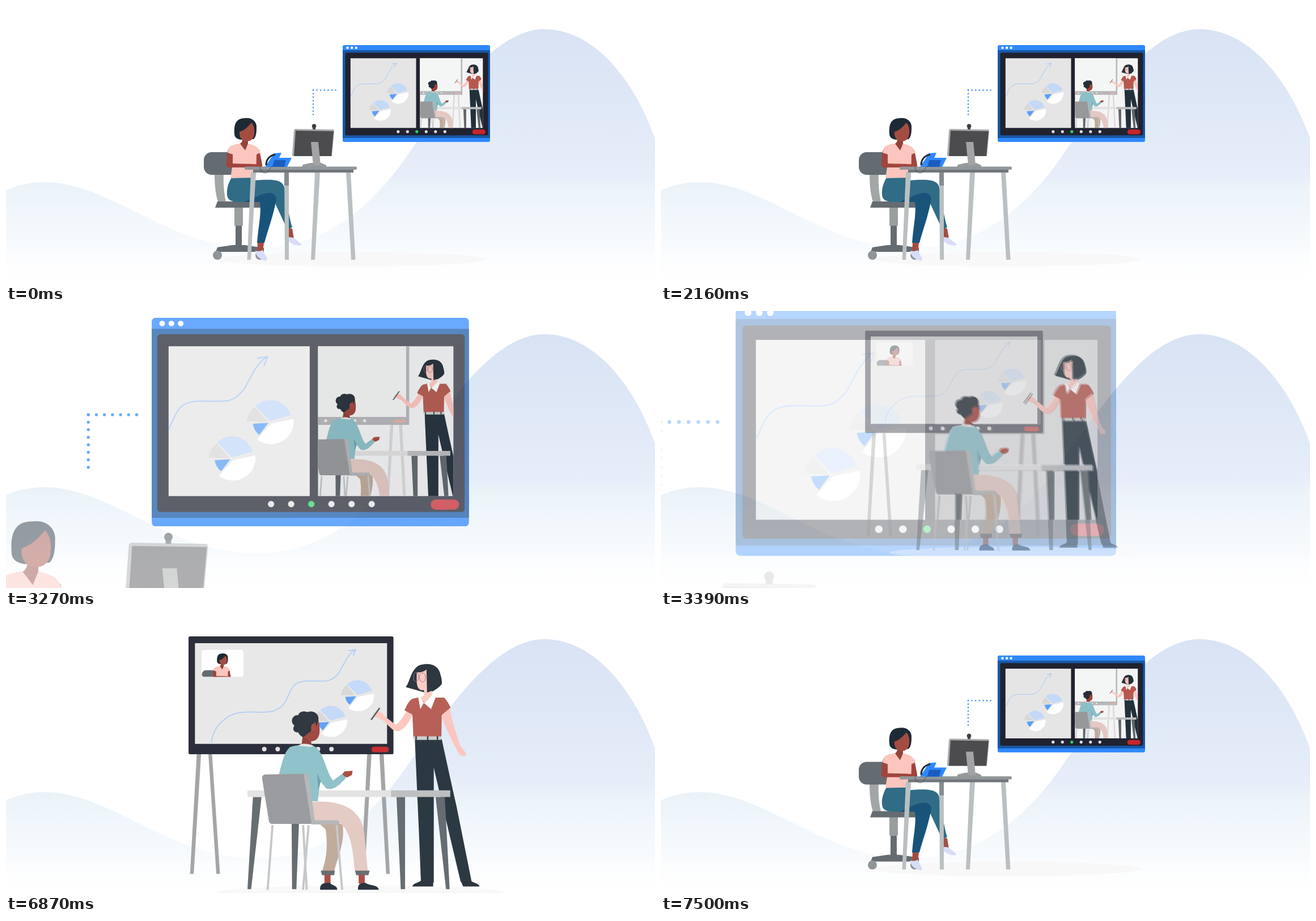
Write an HTML page that moves like this. It is 1145 px wide and 489 px high and loops after 7.63 s.

```html
<!DOCTYPE html>
<html lang="en">
<head>
<meta charset="utf-8">
<title>Remote meeting</title>
<style>
html, body { margin: 0; width: 100%; height: 100%; overflow: hidden; background: #fff; }
svg { display: block; width: 100%; height: 100%; }
</style>
</head>
<body>
<svg viewBox="0 0 1145 489">
<defs>
  <linearGradient id="sky" gradientUnits="userSpaceOnUse" x1="0" y1="41" x2="0" y2="489">
    <stop offset="0" stop-color="#d8e3f4"/>
    <stop offset=".3" stop-color="#dfe8f6"/>
    <stop offset=".58" stop-color="#e7eef9"/>
    <stop offset=".62" stop-color="#ebf3f9"/>
    <stop offset=".86" stop-color="#f8fbfd"/>
    <stop offset=".9" stop-color="#fcfdfe"/>
    <stop offset="1" stop-color="#fff"/>
  </linearGradient>
  <clipPath id="leftPanel"><rect x="607.8" y="92.3" width="115.7" height="123"/></clipPath>
  <clipPath id="rightPanel"><rect x="730.3" y="92.3" width="111" height="123"/></clipPath>
  <clipPath id="inset"><rect x="345" y="51" width="68.5" height="44" rx="4"/></clipPath>

  <g id="pie">
    <path d="M0,-1L-17,-18.500A25,25 0 0 1 24,-8Z" fill="#c3d9f8"/>
    <path d="M-3,0L-27,-1A26,26 0 0 1 -18,-17.500Z" fill="#d8d8d8"/>
    <path d="M-2,1L-20,2A21,21 0 0 0 -12.500,15Z" fill="#5b9ef8"/>
    <path d="M1,2L27,-3.500A26,26 0 0 1 -15,20Z" fill="#fff"/>
  </g>
  <g id="chart">
    <path d="M361,203C363,178 385,154 415,153C445,151 466,160 482,136C492,118 491,104 515,102C545,101 556,107 570,88C580,70 585,58 596,51M585,52.500L597,50.500L593,61" fill="none" stroke="#a4c7f7" stroke-width="1.400"/>
    <use href="#pie" x="600" y="126"/>
    <use href="#pie" x="556" y="168"/>
  </g>

  <g id="easel">
    <path d="M337,222h7L332,418h-6ZM356,222h6L375,418h-6ZM616,222h7L612,418h-6ZM636,222h7L653,418h-6Z"/>
  </g>

  <g id="people">
    <g id="teacher">
      <path d="M682,148C676,160 670,168 663,174L644,159L640,154L635,152L626,155L628,160L641,166L657,181C663,185 668,185 672,182C681,176 686,166 691,156Z" fill="#fdc5bd"/>
      <path d="M738,150L751,147C756,170 762,190 769,209L778,220L776,225L768,224C758,206 746,184 738,160Z" fill="#fdc5bd"/>
      <path d="M622.500,165.500L636.500,146" stroke="#5e5a5c" stroke-width="2.600"/>
      <path d="M694,197H738C744,225 752,262 762,306L787,431H769L738,300L725,244V432H704C701,350 697,270 694,197Z" fill="#22303a"/>
      <path d="M690,438.500C691,433 699,433 704,429H724V438.500ZM769,429H786C789,433 799,433 800,438.500H773Z" fill="#222c36"/>
      <path d="M690,131L699,129H728L742,129C746,133 749,138 752.500,145.500L741,155L738,158L737.500,193H691.500L690,157L677,150C681,141 685,134 690,131Z" fill="#b5594f"/>
      <path d="M691,193H737V198.500H692Z" fill="#cdcdcd"/>
      <path d="M696,192.500v6M715,192.500v6M731,192.500v6" stroke="#22303a" stroke-width="2.200"/>
      <path d="M679,112C687,103 688,75 709,74.500C728,72 735,84 736,92C738.500,99 738.500,105 738,107C731,116 722,120 714,122L694,116Z" fill="#232e37"/>
      <path d="M697,88C704,88 709,87 713,83L714,121L722,118V127L712,139L702,129L709,126V117C701,118 698,113 697,104Z" fill="#fdc9c1"/>
      <path d="M699.500,129L703,148L708.600,138L720.500,148L728,129L722,125C717,132 712,136 709,138L703,128Z" fill="#fff"/>
      <g fill="none" stroke="#99737a" stroke-width=".9">
        <ellipse cx="696" cy="95.500" rx="4.200" ry="7.500"/>
        <ellipse cx="706.500" cy="96" rx="5" ry="7.500"/>
        <path d="M711,95h4"/>
      </g>
    </g>
    <path d="M429,292h14L426,443h-6ZM492,292h14L500,443h-7ZM664,292h14L678,443h-7ZM728,292h15L751,443h-6Z" fill="#5f676c"/>
    <path d="M420,281H655V292H420Z" fill="#e2e2e2"/>
    <path d="M655,281H752V292H655Z" fill="#bcbdbf"/>
    <g id="student">
      <path d="M546,419h10v15h-10ZM602,419h10v15h-10Z" fill="#a6473c"/>
      <path d="M539,444C538,435 543,432 555,432.500C559,438 567,436 567,444ZM601,444C600,435 605,432 613,432.500C620,438 634,435 635,444Z" fill="#222c36"/>
      <path d="M538,336H576C580,368 566,395 562,414H542C551,388 551,368 548,345Z" fill="#bfa998"/>
      <path d="M522,300C575,296 606,312 611,350L617,414H596C592,378 590,350 572,335H522Z" fill="#e3c9c2"/>
      <path d="M540,412.500H563L562,420H542ZM596,412.500H620L618,420H598Z" fill="#62666a"/>
      <path d="M461,338L453,444M511,338L517,444M520,338L511,444M566,338L575,444" stroke="#c3c6c8" stroke-width="3.600"/>
      <path d="M511,188L529,187L524,201L526,210H508Z" fill="#8f3b33"/>
      <path d="M573,257L579,250L592,249L591,256L583,260Z" fill="#a6473c"/>
      <path d="M490,210C500,206 518,207 528,208C545,216 547,248 560,265L575,254L581,261C570,273 560,282 549,278L539,266L535,299H515L471,258C477,232 481,217 490,210Z" fill="#8bbfc7"/>
      <path d="M534,253L540,267L536,280Z" fill="#6b9da5"/>
      <path d="M503,208C508,203 519,204 528,208L524,210Z" fill="#e6e6e6"/>
      <path d="M511,193L524,168L536,165C538,172 538.500,180 538,186C537,197 531,201 522,201Z" fill="#9d4239"/>
      <path d="M497,175C489,170 493,157 503,158C505,151 514,151 518,153C527,149 538,155 536,166L533,176L531,169L525,174L524,184L511,194C506,192 504,188 503,186C495,187 493,179 497,175Z" fill="#262f38"/>
      <ellipse cx="528" cy="178" rx="4" ry="5.500" fill="#a6473c"/>
      <path d="M449,255L516,254L527,336H460Q456,336 455,331L444,262Q443,256 449,255Z" fill="#97989b"/>
      <path d="M512,254Q520,253 521,259L530,330H567Q571,331 571,337H525Z" fill="#b3b4b6"/>
    </g>
  </g>

  <g id="woman">
    <path d="M368,296H384C383,315 385,332 388,346H374C369,330 368,312 368,296Z" fill="#a2a6a7"/>
    <rect x="349" y="258" width="62" height="40" rx="14" fill="#656c71"/>
    <path d="M403,355h15v33h-15Z" fill="#999e9f"/>
    <path d="M369,356L373,345H452V356ZM405,388h11v35h-11ZM370,434L373,426L400,422H420L455,427V434Z" fill="#656c71"/>
    <circle cx="373" cy="440" r="8" fill="#8f9597"/>
    <circle cx="448" cy="440" r="8" fill="#8f9597"/>
    <path d="M444,416l11,2l-2,17h-10ZM497,391l8,2l3,18l-10,-2Z" fill="#a54c41"/>
    <path d="M440,432C447,434 450,432 453,431L461,446L459,450C449,448 440,442 440,432ZM499,408L507,409L521,420L520,423C509,423 499,419 497,411Z" fill="#d7ddf8"/>
    <path d="M398,303C391,314 388,328 391,338C395,347 408,346 425,346L470,338L496,394L505,391C497,365 496,338 490,317C484,305 465,306 437,308V300Z" fill="#306c86"/>
    <path d="M420,346H448C451,365 445,390 443,418H456C462,395 472,370 477,340C474,327 463,329 450,333Z" fill="#18547a"/>
    <path d="M394,251C388,258 391,270 388,281L398,286H452V280L447,254Z" fill="#a0453d"/>
    <path d="M394,249C402,243 411,243 416,243H428C439,246 443,248 445,252L449,259L442,262L441,303L396,304L400,278V262L391,259Z" fill="#fcc5be"/>
    <path d="M389,277C400,279 430,278 452,280V285H392Q388,283 389,277Z" fill="#a0453d"/>
    <path d="M417,232H427V243L422,255L413,243Q418,240 417,232Z" fill="#94423a"/>
    <path d="M403,226C402,212 404,198 421,198C434,196 443,204 442,215C442,224 441,231 437,235L420,236C412,237 403,234 403,226Z" fill="#1d2a36"/>
    <path d="M412,222C420,220 427,213 433,206C437,210 439,217 438,226C437,235 431,239 425,239C416,238 411,232 412,222Z" fill="#a54c41"/>
  </g>
</defs>

<path fill="url(#sky)" d="M0,325C45,306 90,307 140,324C230,355 320,427 440,428C560,429 650,352 712,258C780,165 860,41 950,41C1040,41 1110,135 1145,234V489H0Z"/>

<g id="desk">
  <ellipse cx="610" cy="447" rx="235" ry="13" fill="#f8f8f9"/>
  <use href="#woman"/>
  <path d="M432,293h9L432,448h-6.500ZM491,293h8v155h-7ZM545,293h9L545,448h-7ZM600,293h8L616.500,448h-7.500Z" fill="#bac0c2"/>
  <path d="M491,293h8v24h-8Z" fill="#858b8f"/>
  <path d="M436,288H613V294H436Z" fill="#70767b"/>
  <rect x="421" y="283.500" width="198" height="5.500" rx="2" fill="#91979a"/>
  <path d="M457,284L473,260L486,259L482,268H504L496,284Z" fill="#2f88ff"/>
  <path d="M473,272H494L491,284H470Z" fill="#1b5dbd"/>
  <path d="M459,281C459,270 466,264 475,262" fill="none" stroke="#222d3a" stroke-width="3.200"/>
  <path d="M448,284C448,292 456,297 460,294C465,291 466,285 470,283" fill="none" stroke="#222d3a" stroke-dasharray="1.500 1"/>
  <path d="M522,284L524,280L538,277H556L565,281V284Z" fill="#97999b"/>
  <path d="M511,217L577,218Q579,218 579,221L575,265H506Q504,264 505,261L508,220Q508,217 511,217Z" fill="#a9abac"/>
  <path d="M511,220L578,221L574,265H508Z" fill="#4c4c4f"/>
  <path d="M538,240H551L555,281H542Z" fill="#a1a3a4"/>
  <path d="M541,212h5v6h-5Z" fill="#4c4c4f"/>
  <circle cx="543.500" cy="212" r="3.800" fill="#3e3f42"/>
</g>

<g id="frame">
  <path d="M542,148.500H583" fill="none" stroke="#2f88ff" stroke-width="2.500" stroke-linecap="round" stroke-dasharray="0 6.600"/>
  <path d="M542,148.500V192" fill="none" stroke="#2f88ff" stroke-width="2.500" stroke-linecap="round" stroke-dasharray="0 6.160"/>
  <rect x="594" y="69" width="260" height="171" rx="3" fill="#2f88ff"/>
  <path d="M594,78H854V233H594Z" fill="#1757a6"/>
  <rect x="598.500" y="82.500" width="252" height="145.700" rx="2.500" fill="#20222f"/>
  <g id="windowDots" fill="#fff"></g>
  <g id="callButtons" fill="#e4e4e4"></g>
  <rect x="822.700" y="218" width="23.200" height="8.400" rx="4.200" fill="#c7252b"/>
  <g clip-path="url(#leftPanel)">
    <path d="M600,90H730V220H600Z" fill="#e5e5e5"/>
    <use href="#chart" transform="translate(265 65) scale(.71)"/>
  </g>
</g>

<g id="roomPanel">
  <g clip-path="url(#rightPanel)">
    <path d="M730,90H845V220H730Z" fill="#f4f4f5"/>
    <g transform="translate(566.300 76.400) scale(.3623)">
      <use href="#easel" fill="#d9d9db"/>
      <path d="M324,29H659V222H324Z" fill="#b7b7ba"/>
      <path d="M334,40H652V204H334Z" fill="#f4f5f5"/>
      <g id="paleButtons" fill="#eee"></g>
      <rect x="624" y="210" width="27" height="7" rx="3" fill="#dfb1a6"/>
      <use href="#people"/>
    </g>
  </g>
</g>

<g id="meeting">
  <ellipse cx="605" cy="448" rx="235" ry="11" fill="#f8f8f9"/>
  <use href="#easel" fill="#a0a1a2"/>
  <rect x="323.500" y="29" width="335.500" height="193" rx="2.500" fill="#222532"/>
  <path d="M334,40H648.500V205H334Z" fill="#e7e7e7"/>
  <use href="#chart"/>
  <g id="boardButtons" fill="#e2e2e2"></g>
  <rect x="623" y="209.700" width="28.500" height="9" rx="4.500" fill="#c7252b"/>
  <use href="#people"/>
</g>

<g id="insetView" clip-path="url(#inset)">
  <path d="M340,50H420V100H340Z" fill="#fff"/>
  <use href="#woman" transform="translate(185.300 -33.900) scale(.4587)"/>
</g>
</svg>

<script>
const LOOP = 7630, STEP = 30, ZOOM = 607;
const OPEN_AT = 2903, HOLD_AT = 3570, CLOSE_AT = 6870;
const el = id => document.getElementById(id);

function addDots(id, count, x, y, gap, r, greenIndex = -1) {
  for (let i = 0; i < count; i++) {
    const dot = document.createElementNS(el(id).namespaceURI, "circle");
    dot.setAttribute("cx", x + i * gap);
    dot.setAttribute("cy", y);
    dot.setAttribute("r", r);
    if (i === greenIndex) dot.setAttribute("fill", "#2fd566");
    el(id).append(dot);
  }
}
addDots("windowDots", 3, 602.5, 73.7, 7.6, 2.3);
addDots("callButtons", 6, 691.8, 221.8, 16.5, 2.6, 2);
addDots("paleButtons", 6, 448, 212.5, 22, 3.4);
addDots("boardButtons", 6, 447.5, 213.5, 22, 3.7, 2);

const ramp = (t, from, to) => Math.min(1, Math.max(0, (t - from) / (to - from)));
const smooth = u => u * u * (3 - 2 * u);

function place(id, alpha, scale = 1, x = 0, y = 0) {
  const node = el(id);
  node.style.display = alpha > 0 ? "" : "none";
  node.setAttribute("opacity", alpha);
  node.setAttribute("transform", `translate(${x} ${y}) scale(${scale})`);
}

// Zoom into the call window until its right panel becomes the meeting room.
function openMeeting(t) {
  const p = smooth(ramp(t, OPEN_AT, OPEN_AT + ZOOM));
  const s = 1 + 1.76 * p, x = -1560 * p, y = -208.5 * p;
  place("desk", 1 - ramp(t, 3070, 3430), 1 + 1.48 * p, -1197 * p, -28 * p);
  place("frame", 1 - ramp(t, 3180, 3500), s, x, y);
  place("roomPanel", 1 - ramp(t, 3240, 3560), s, x, y);
  const room = [.3623 * s, 566.3 * s - 1563 * p, 76.4 * s - 211 * p];
  const alpha = ramp(t, 3310, 3520);
  place("meeting", alpha, ...room);
  place("insetView", alpha, ...room);
}

// Zoom into the inset until its caller lines up with the desk scene.
function closeMeeting(t) {
  const p = t < CLOSE_AT ? 0 : smooth(ramp(t, CLOSE_AT - 95, CLOSE_AT - 95 + ZOOM));
  const s = 1 + 1.18 * p, x = -404 * p, y = 74 * p;
  const k = .4587 * s, dx = 185.3 * s + x, dy = -33.9 * s + y;
  const arriving = ramp(t, 7220, 7450);
  place("meeting", t < CLOSE_AT ? 1 : 1 - ramp(t, 6840, 7500), s, x, y);
  place("insetView", 1 - ramp(t, 7400, 7490), s, x, y);
  place("desk", arriving, k, dx, dy - .6);
  place("frame", arriving, k, dx, dy + .7);
  place("roomPanel", arriving, k, dx, dy + .7);
}

function draw(now) {
  const time = now % LOOP;
  const t = Math.min(7500, time - time % STEP);
  (t < HOLD_AT ? openMeeting : closeMeeting)(t);
  requestAnimationFrame(draw);
}
draw(performance.now());
</script>
</body>
</html>
```
